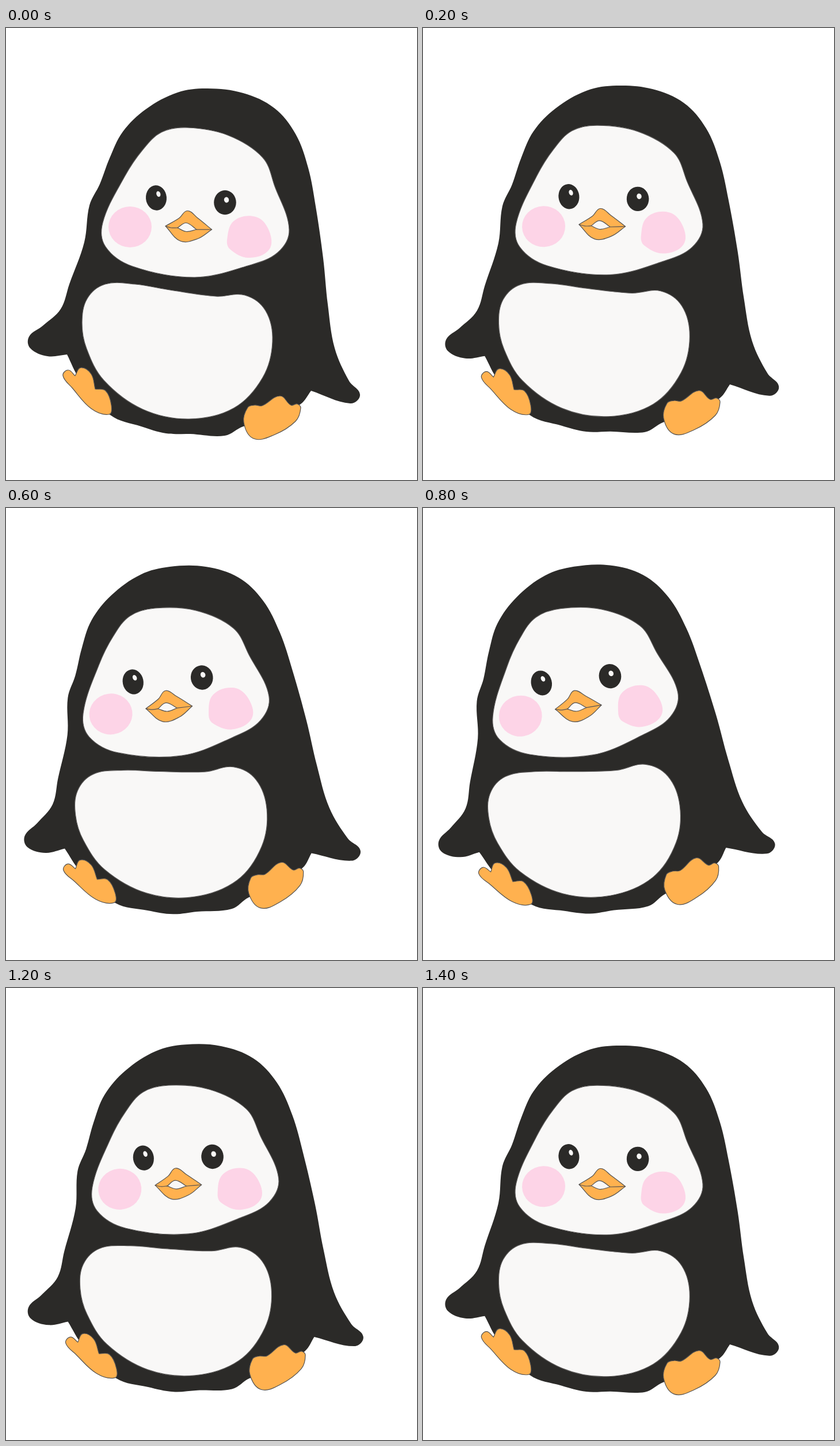
Recreate the animation shown at these times as an HTML page with a canvas. Size 714 by 785 pixels, loop 1.6 s.

```html
<!DOCTYPE html>
<html lang="en">
<head>
<meta charset="utf-8">
<title>Rocking penguin</title>
<style>
  html, body { margin: 0; width: 100%; height: 100%; overflow: hidden; background: #fff; }
  canvas { display: block; }
</style>
</head>
<body>
<canvas id="stage" width="714" height="785"></canvas>
<script>
const ctx = document.getElementById('stage').getContext('2d');
const INK = '#2b2a28', WHITE = '#f9f8f7', ORANGE = '#ffb14f', PINK = '#fdd4e7', LINE = '#555352';
const STEP = 200;

// Tilt in degrees and pivot position, from one end of the swing to the other
const poses = [
  [0, 326.5, 592.5],
  [-1.85, 328.5, 588],
  [-4.9, 329.5, 586],
  [-7.4, 324, 588.5],
  [-9.5, 319.5, 586.5]
];
const [, pivotX, pivotY] = poses[0];

// Smooth curve through flat x,y points; handles follow the neighbours' chord.
function spline(path, run, closed) {
  const n = run.length / 2;
  const at = i => {
    const k = closed ? (i + n) % n : Math.max(0, Math.min(n - 1, i));
    return [run[2 * k], run[2 * k + 1]];
  };
  const handle = (from, to, size) => {
    const dx = to[0] - from[0], dy = to[1] - from[1];
    const k = size / Math.hypot(dx, dy);
    return [dx * k, dy * k];
  };
  const last = closed ? n : n - 1;
  for (let i = 0; i < last; i++) {
    const [a, b, c, d] = [at(i - 1), at(i), at(i + 1), at(i + 2)];
    const size = 0.35 * Math.hypot(c[0] - b[0], c[1] - b[1]);
    const u = handle(a, c, size), v = handle(b, d, size);
    path.bezierCurveTo(b[0] + u[0], b[1] + u[1], c[0] - v[0], c[1] - v[1], c[0], c[1]);
  }
}

// A single run wraps around; several runs meet in sharp corners.
function shape(...runs) {
  const path = new Path2D();
  path.moveTo(runs[0][0], runs[0][1]);
  runs.forEach(run => spline(path, run, runs.length === 1));
  path.closePath();
  return path;
}

function line(run) {
  const path = new Path2D();
  path.moveTo(run[0], run[1]);
  spline(path, run, false);
  return path;
}

function oval(x, y, rx, ry, tilt = 0) {
  const path = new Path2D();
  path.ellipse(x, y, rx, ry, tilt, 0, Math.PI * 2);
  return path;
}

const body = shape(
  [106,567, 72,570, 42,556, 40,536, 64,517, 95,488, 110,445, 136,372, 145,308,
   163,271, 180,226, 203,180, 243,141, 298,112, 350,105, 412,113, 466,139, 503,184,
   525,243, 538,310, 551,400, 559,480, 571,556, 596,613, 615,637, 598,652, 530,630],
  [530,630, 512,653, 455,683, 412,692, 380,708, 320,705, 278,704, 235,692,
   181,672, 128,610, 106,567]);

const face = shape(
  [315,173, 385,186, 446,225, 467,275, 492,350, 472,390, 420,413, 328,433,
   220,414, 173,380, 168,338, 206,258, 237,212, 270,181]);

const belly = shape(
  [132,512, 141,470, 172,445, 225,445, 285,455, 365,466, 415,464, 451,491,
   463,545, 446,607, 396,660, 318,679, 237,662, 170,612, 140,557]);

const leftFoot = shape(
  [120,604, 130,590, 148,601, 155,627],
  [155,627, 173,630, 183,655, 179,671, 148,661, 115,625, 99,604, 108,594, 120,604]);

const rightFoot = shape(
  [413,685, 420,659, 432,655, 445,656, 476,639, 495,655, 506,653, 512,660,
   503,683, 465,707, 430,713]);

const beak = shape(
  [277,344, 301,330, 315,317.5, 333,330, 357.5,350],
  [357.5,350, 333,366, 303,370, 277,344]);

const mouth = shape(
  [298,347, 313,338.5, 331,350],
  [331,350, 313,353.5, 298,347]);

const lips = [line([277,344, 287,347, 298,347]), line([331,350, 357.5,350])];

const leftCheek = oval(215.5, 345.5, 37.5, 35.5);
const rightCheek = shape([384,368, 396,335, 434,328, 457,352, 457,385, 421,399, 389,384]);
const eyes = [oval(261, 295, 18, 21.7, -0.08), oval(380.5, 303, 19.3, 21.2)];
const glints = [oval(264.8, 288.3, 3.5, 5, -0.3), oval(383, 298.5, 4.2, 4.9, -0.2)];

function paint(path, fill, stroke) {
  if (fill) {
    ctx.fillStyle = fill;
    ctx.fill(path);
  }
  if (stroke) {
    ctx.strokeStyle = stroke;
    ctx.lineWidth = 1.2;
    ctx.stroke(path);
  }
}

function draw(pose) {
  const [tilt, x, y] = poses[pose];
  ctx.resetTransform();
  ctx.fillStyle = '#fff';
  ctx.fillRect(0, 0, 714, 785);
  ctx.translate(x, y);
  ctx.rotate(tilt * Math.PI / 180);
  ctx.translate(-pivotX, -pivotY);

  paint(body, INK);
  paint(face, WHITE, LINE);
  paint(belly, WHITE, LINE);
  paint(leftCheek, PINK);
  paint(rightCheek, PINK);
  eyes.forEach(e => paint(e, INK));
  glints.forEach(g => paint(g, WHITE));
  paint(beak, ORANGE, LINE);
  paint(mouth, WHITE, LINE);
  lips.forEach(l => paint(l, null, LINE));
  paint(leftFoot, ORANGE, LINE);
  paint(rightFoot, ORANGE, LINE);
}

const start = performance.now();
let shown = -1;

function tick() {
  const step = Math.floor((performance.now() - start) / STEP) % 8;
  const pose = step < 5 ? step : 8 - step;
  if (pose !== shown) draw(shown = pose);
  requestAnimationFrame(tick);
}
tick();
</script>
</body>
</html>
```
